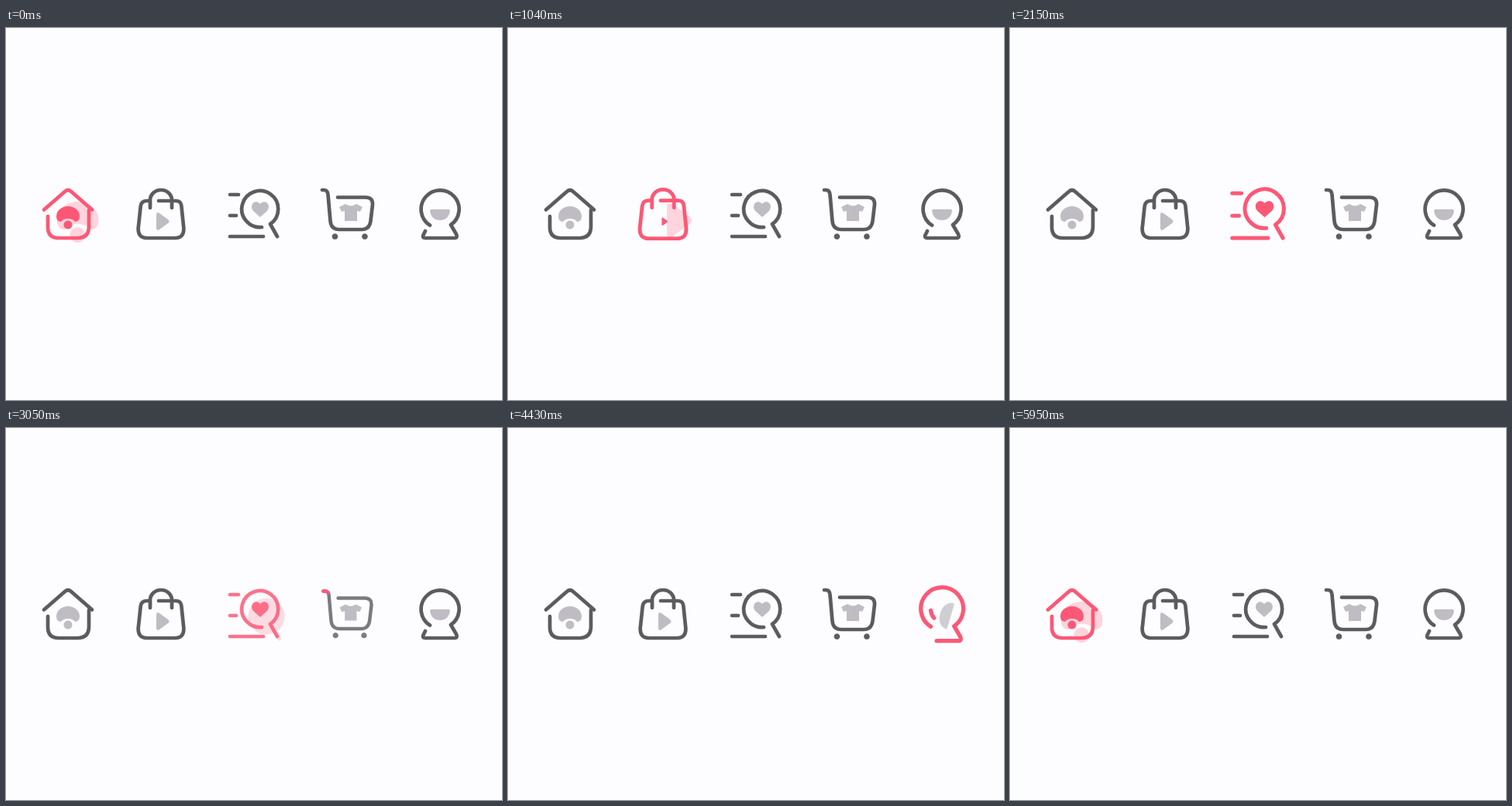
Recreate the animation shown at these times as an HTML page. Size 640 by 480 pixels, loop 6.02 s.

```html
<!DOCTYPE html>
<html lang="en">
<head>
<meta charset="utf-8">
<title>Tab bar icons</title>
<style>
  html, body { margin: 0; width: 100%; height: 100%; overflow: hidden; background: #fdfdff; }
  svg { display: block; width: 640px; height: 480px; }
  .line { fill: none; stroke-width: 4.7; stroke-linecap: round; stroke-linejoin: round; }
</style>
</head>
<body>
<svg id="stage" viewBox="0 0 640 480"></svg>
<script>
const LOOP = 6020;
const DARK = '#5c5b5f', GREY = '#bfbdc3', RED = '#fc5876', PINK = '#ffd4dc';

const cap = 'M65 243A15 13 0 0 1 95 243Q95 250 89 250Q86 246 80 246Q74 246 71 250Q65 250 65 243Z';
const mushroom = cap + 'M80 248.5a5.5 5.5 0 1 1 -.1 0Z';
const play = 'M194 241Q194 236.5 198 239L209 247Q212 249.5 209 252L198 260Q194 262.5 194 258Z';
const basket = 'M408 209H410Q415 209 415.5 215L418.5 249Q419.5 260 430 260H459Q469 260 470.5 249L473 228Q473.5 218.5 464 218.5H428';
const person = 'M547 254.5A24.5 24.5 0 1 1 574 254L581 266Q583 271 579 271H541Q537 271 538.5 267L541 262';

// at: activation time, pop: when the inner symbol grows, shadow: [path, transform, stroke width]
const icons = [
  { x: 80, at: 5398, pop: [180, 320], inner: mushroom, pivot: [80, 244],
    lines: ['M54 243V257Q54 271 68 271H92Q107 271 107 256V235',
            'M49 234.5L76 211Q80 207.5 84 211L111 234.5'],
    shadow: [mushroom, 'translate(92.5 242) scale(1.8) translate(-80 -240)', 0] },
  { x: 200, at: 596, pop: [380, 520], inner: play, pivot: [202, 249.5],
    lines: ['M197 223H219Q225.500 223 226.300 229L229.300 258Q230 271 218 271H182Q170 271 170.700 258L173.700 230Q174.500 223 182 223H184',
            'M186 232V222A14 13 0 0 1 214 222V232'],
    shadow: [play, 'translate(222 248) scale(1.9) translate(-203 -249.5)', 0] },
  { x: 320, at: 1800, pop: [180, 320], pivot: [328, 234],
    inner: 'M328 244L319 236C313 228 322 220 328 227C334 220 343 228 337 236Z',
    lines: ['M289 215H300', 'M289 242H297', 'M289 269H332',
            'M330 257A23.5 23.5 0 1 1 341 253L350 269'],
    shadow: ['M330 254.5A21 21 0 1 1 339 251.5L344.5 262.5L339 251.5Z', 'translate(8 9.5)', 5] },
  { x: 441, at: 3008, pop: [180, 320], pivot: [445, 238],
    inner: 'M438 227Q445 232 452 227L460 231L457 237L453 236V249H437V236L433 237L430 231Z',
    lines: [basket, 'M424.5 267.5a1.5 1.5 0 1 1 -.1 0', 'M463 267.5a1.5 1.5 0 1 1 -.1 0'],
    shadow: ['M416 218.5H464Q473.5 218.5 473 228L470.5 249Q469 260 459 260H430Q419.5 260 418.5 249Z',
             'translate(9 9)', 0] },
  { x: 560, at: 4205, pivot: [560, 241], spins: true,
    inner: 'M547 236Q549 248 560 248Q571 248 573 236Q573 234 571 234H549Q547 234 547 236Z',
    lines: [person],
    shadow: [person, 'translate(577.5 249) scale(.85) translate(-560 -240)', 5] }
];

const smooth = (a, b, t) => {
  const p = Math.min(1, Math.max(0, (t - a) / (b - a)));
  return p * p * (3 - 2 * p);
};
const wrap = t => ((t % LOOP) + LOOP) % LOOP;

function set(el, attrs) {
  for (const key in attrs) el.setAttribute(key, attrs[key]);
  return el;
}
function add(parent, tag, attrs = {}) {
  const el = document.createElementNS('http://www.w3.org/2000/svg', tag);
  return parent.appendChild(set(el, attrs));
}
const addLine = (parent, d, stroke) => add(parent, 'path', { d, stroke, class: 'line' });

// Shows the first `length` units of a path.
function trace(el, length) {
  set(el, { 'stroke-dasharray': `${Math.max(0, length)} 999`,
            visibility: length > 0 ? 'visible' : 'hidden' });
}
const about = ([x, y], change) => `translate(${x} ${y}) ${change} translate(${-x} ${-y})`;

const stage = document.getElementById('stage');
icons.forEach((icon, i) => {
  icon.life = wrap(icons[(i + 1) % icons.length].at - icon.at);
  icon.root = add(stage, 'g');
  const [d, transform, width] = icon.shadow;
  icon.glow = add(icon.root, 'path', { d, transform, fill: PINK, stroke: PINK,
    'stroke-width': width, 'stroke-linejoin': 'round', 'stroke-linecap': 'round' });
  icon.idle = add(icon.root, 'g');
  icon.lines.forEach(path => addLine(icon.idle, path, DARK));
  icon.idleInner = add(icon.root, 'path', { d: icon.inner, fill: GREY });
  icon.lit = add(icon.root, 'g');
  icon.strokes = icon.lines.map(path => addLine(icon.lit, path, RED));
  icon.lengths = icon.strokes.map(el => el.getTotalLength());
  icon.total = icon.lengths.reduce((a, b) => a + b);
  icon.litInner = add(icon.lit, 'path', { d: icon.inner, fill: RED });
  if (icon.spins) icon.smile = addLine(icon.lit, icon.inner, RED);
});

function popScale(t) {
  if (t < 90) return 1 - 0.2 * (t / 90) ** 2;
  if (t < 210) return 0.8 + 0.32 * smooth(90, 210, t);
  return 1.12 - 0.12 * smooth(210, 530, t);
}

function drawIcon(icon, now) {
  const t = wrap(now - icon.at);
  const rest = t - icon.life;
  const leaving = rest >= 0;
  const off = smooth(0, 160, rest);
  const back = smooth(30, 130, rest);

  set(icon.root, { transform: about([icon.x, 240], `scale(${popScale(t)})`) });
  set(icon.glow, { opacity: smooth(370, 450, t) * (1 - off) });
  set(icon.idle, { opacity: leaving ? back : 1 - smooth(0, 150, t) });
  set(icon.idleInner, { opacity: leaving ? back : 1 - smooth(180, 320, t) });
  set(icon.lit, { opacity: 1 - off });

  let left = icon.total * smooth(12, 288, t);
  icon.strokes.forEach((el, i) => {
    trace(el, left);
    left -= icon.lengths[i];
  });

  if (icon.spins) {
    const turn = leaving ? 0 : smooth(100, 350, t);
    const swing = 4 * turn * (1 - turn);
    const change = `translate(${4 * swing} 0) rotate(${210 * turn}) scale(${1 + 0.2 * swing} ${1 - 0.1 * swing})`;
    set(icon.idleInner, { transform: about(icon.pivot, change) });
    set(icon.litInner, { opacity: smooth(330, 430, t) });
    trace(icon.smile, 41 * smooth(160, 370, t));
    set(icon.smile, { opacity: 1 - smooth(430, 500, t) });
  } else {
    set(icon.litInner, { transform: about(icon.pivot, `scale(${smooth(...icon.pop, t)})`) });
  }
}

function frame() {
  const now = performance.now() % LOOP;
  icons.forEach(icon => drawIcon(icon, now));
  requestAnimationFrame(frame);
}
frame();
</script>
</body>
</html>
```
